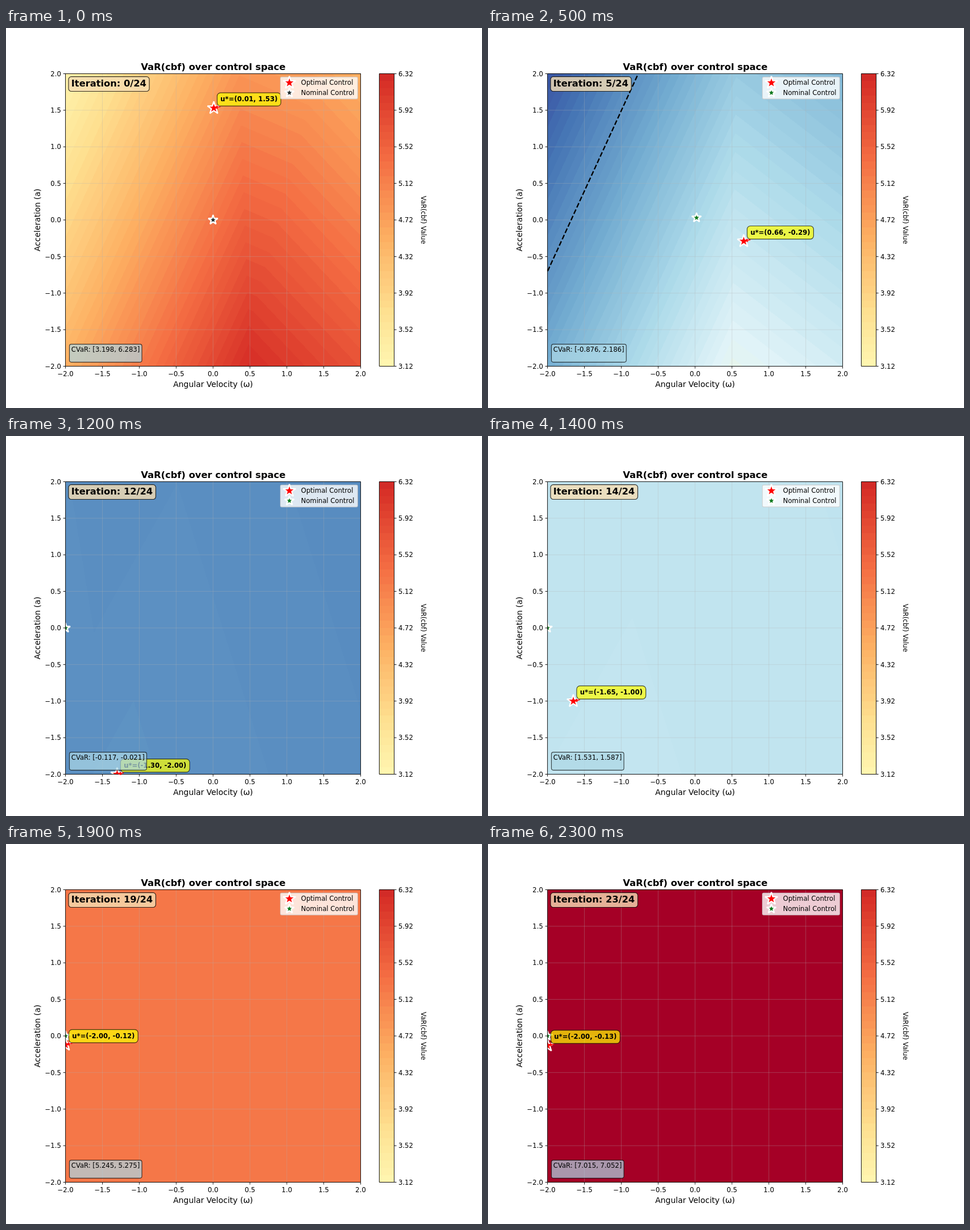
Animation of 837x669 px, one loop 2400 ms. Source, as an HTML page with a canvas:

```html
<!DOCTYPE html>
<html lang="en">
<head>
<meta charset="utf-8">
<title>VaR(cbf) over control space</title>
<style>
html, body { margin: 0; width: 100%; height: 100%; overflow: hidden; background: #fff; }
canvas { display: block; }
</style>
</head>
<body>
<canvas id="stage" width="837" height="669"></canvas>
<script>
const ctx = document.getElementById('stage').getContext('2d');
const PT = 1.1625; // pixels per typographic point
const LEFT = 104.6, RIGHT = 623.6, TOP = 80.4, BOTTOM = 595.5;
const MID_X = (LEFT + RIGHT) / 2, MID_Y = (TOP + BOTTOM) / 2;
const STEPS = 24, STEP_MS = 100;
const { min, max, floor, PI } = Math;

const px = w => MID_X + w * (RIGHT - LEFT) / 4;
const py = a => MID_Y - a * (BOTTOM - TOP) / 4;
const mix = (a, b, t) => a + (b - a) * t;
const signed = (v, n) => v.toFixed(n).replace('-', '\u2212');

// Colour scale: blue - yellow - red, 256 entries
const STOPS = ['313695', '4575b4', '74add1', 'abd9e9', 'e0f3f8', 'ffffbf',
  'fee090', 'fdae61', 'f46d43', 'd73027', 'a50026']
  .map(h => [0, 2, 4].map(i => parseInt(h.slice(i, i + 2), 16)));
const PALETTE = Array.from({ length: 256 }, (_, i) => {
  const p = i / 25.5, k = min(9, floor(p));
  return STOPS[k].map((c, j) => Math.round(mix(c, STOPS[k + 1][j], p - k)));
});
const colorOf = v => PALETTE[max(0, min(255, floor((v + 1.3) / 8.36 * 256)))];

// Value surfaces over angular velocity w and acceleration a
function surfaceStart(w, a) {
  return min(3.198 + .712 * (w + 2) - .324 * (a - 2),
    4.871 - .155 * (w - .35) - .357 * (a - 2),
    5.166 - .33 * (w - 1.1) - .31 * (a - .85));
}
function surfaceRidge(w, a) {
  return min(-.876 + .712 * (w + 2) - .324 * (a - 2),
    2.19 - .24 * (w - .53) - .31 * (a + 2));
}
function surfaceSlope(w, a) {
  const d = w - .9 - (a + 2) * .0975;
  return min(.3545 * d, .43 * d + .113);
}
function surfaceFlat(w, a) {
  const left = -.059 + .0308 * (w + 1.55 - a / 1.8);
  const edge = -.059 - .03 * (w + 1.66 + a * .16);
  return min(-.059 - .0214 * (w - .08 + a / 3.2), max(left, edge));
}

const SURFACES = [
  [0, surfaceStart], [5, surfaceRidge], [9, surfaceSlope], [12, surfaceFlat],
  [16, () => 3.187], [19, () => 5.26], [23, () => 7.033]
];
const RANGE = [[0, 3.198, 6.283], [5, -.876, 2.186], [9, -1.3, .39], [12, -.117, -.021],
  [16, 3.179, 3.195], [19, 5.245, 5.275], [23, 7.015, 7.052]];
const OPTIMAL = [[0, .01, 1.53], [5, .66, -.29], [9, 2, .24], [10, 2, 2], [12, -1.3, -2],
  [16, -2, 0], [19, -2, -.12], [23, -2, -.13]];
const NOMINAL = [[0, 0, 0], [5, .02, .03], [9, -2, .4], [12, -2, 0], [23, -2, 0]];

function segment(keys, n) {
  let i = 0;
  while (i < keys.length - 2 && n >= keys[i + 1][0]) i++;
  const a = keys[i], b = keys[i + 1];
  return [a, b, (n - a[0]) / (b[0] - a[0])];
}
function pairAt(keys, n) {
  const [a, b, t] = segment(keys, n);
  return [mix(a[1], b[1], t), mix(a[2], b[2], t)];
}
function surfaceAt(n) {
  const [a, b, t] = segment(SURFACES, n);
  if (t === 0) return a[1];
  if (t === 1) return b[1];
  return (w, y) => mix(a[1](w, y), b[1](w, y), t);
}
function levelStep(lo, hi) {
  const raw = (hi - lo) / 41, mag = 10 ** floor(Math.log10(raw));
  return mag * [1, 1.5, 2, 2.5, 3, 4, 5, 6, 8, 10].find(s => s * mag >= raw);
}

// Drawing helpers
function text(str, x, y, pt = 10, align = 'left', weight = '', angle = 0) {
  ctx.save();
  ctx.translate(x, y);
  ctx.rotate(angle);
  ctx.font = `${weight} ${pt * PT}px "DejaVu Sans", sans-serif`;
  ctx.textAlign = align;
  ctx.fillStyle = '#000';
  ctx.fillText(str, 0, 0);
  ctx.restore();
}
function textWidth(str, pt, weight = '') {
  ctx.font = `${weight} ${pt * PT}px "DejaVu Sans", sans-serif`;
  return ctx.measureText(str).width;
}
function line(x1, y1, x2, y2, color = '#000', width = .8 * PT) {
  ctx.beginPath();
  ctx.moveTo(x1, y1);
  ctx.lineTo(x2, y2);
  ctx.strokeStyle = color;
  ctx.lineWidth = width;
  ctx.stroke();
}
function box(x, y, w, h, r, fill, alpha, border = '#000', width = PT) {
  ctx.save();
  ctx.globalAlpha = alpha;
  ctx.beginPath();
  ctx.roundRect(x, y, w, h, r);
  ctx.fillStyle = fill;
  ctx.fill();
  ctx.strokeStyle = border;
  ctx.lineWidth = width;
  ctx.stroke();
  ctx.restore();
}
function star(x, y, size, fill) {
  ctx.beginPath();
  for (let i = 0; i < 10; i++) {
    const r = size / 2 * PT * (i % 2 ? .382 : 1), t = i * PI / 5;
    ctx.lineTo(x + r * Math.sin(t), y - r * Math.cos(t));
  }
  ctx.closePath();
  ctx.fillStyle = fill;
  ctx.fill();
  ctx.lineJoin = 'bevel';
  ctx.strokeStyle = '#fff';
  ctx.lineWidth = 2 * PT;
  ctx.stroke();
}

const heat = new ImageData(519, 516);
function drawHeat(f, lo, hi) {
  const step = levelStep(lo, hi), { width, height, data } = heat;
  for (let j = 0, p = 0; j < height; j++) {
    const a = 2 - (j + .5) / height * 4;
    for (let i = 0; i < width; i++, p += 4) {
      const v = f((i + .5) / width * 4 - 2, a);
      const c = colorOf((floor(v / step) + .5) * step);
      data[p] = c[0];
      data[p + 1] = c[1];
      data[p + 2] = c[2];
      data[p + 3] = 255;
    }
  }
  ctx.putImageData(heat, 105, 80);
}

// Dashed zero level, rising and falling sides separately
function drawZero(f) {
  ctx.save();
  ctx.setLineDash([7.4 * PT, 3.2 * PT]);
  ctx.strokeStyle = '#000';
  ctx.lineWidth = 2 * PT;
  for (const dir of [1, -1]) {
    ctx.beginPath();
    for (let j = 0; j <= 80; j++) {
      const a = -2 + j / 20;
      for (let i = 0; i < 80; i++) {
        const w = -2 + i / 20, v = dir * f(w, a), next = dir * f(w + .05, a);
        if (v < 0 && next >= 0) {
          ctx.lineTo(px(w + .05 * v / (v - next)), py(a));
          break;
        }
      }
    }
    ctx.stroke();
  }
  ctx.restore();
}

function drawAxes() {
  ctx.strokeStyle = '#000';
  ctx.lineWidth = .8 * PT;
  ctx.strokeRect(LEFT, TOP, RIGHT - LEFT, BOTTOM - TOP);
  for (let v = -2; v <= 2; v += .5) {
    line(px(v), BOTTOM, px(v), BOTTOM + 4);
    line(LEFT, py(v), LEFT - 4, py(v));
    text(signed(v, 1), px(v), 612.7, 10, 'center');
    text(signed(v, 1), 96.8, py(v) + 4.3, 10, 'right');
  }
  text('VaR(cbf) over control space', MID_X + .3, 73.6, 14, 'center', 'bold');
  text('Angular Velocity (\u03c9)', MID_X, 631.6, 12, 'center');
  text('Acceleration (a)', 60, MID_Y, 12, 'center', '', -PI / 2);
}

function drawLabel(w, a) {
  const x = px(w), y = py(a), str = `u*=(${w.toFixed(2)}, ${a.toFixed(2)})`;
  line(x + 11.7, y - 2.6, x + 2.5, y - .6, '#f00', 1.5 * PT);
  line(x + 6.6, y - 3.9, x + 2.5, y - .6, '#f00', 1.5 * PT);
  line(x + 7.6, y + .7, x + 2.5, y - .6, '#f00', 1.5 * PT);
  box(x + 5.9, y - 26.8, textWidth(str, 10, 'bold') + 11.6, 23.2, 5.8, '#ff0', .7);
  text(str, x + 11.7, y - 11.6, 10, 'left', 'bold');
}

function drawColorbar() {
  const x = 656.4, w = 26.2, h = (BOTTOM - TOP) / 40;
  for (let i = 0; i < 40; i++) {
    ctx.fillStyle = `rgb(${colorOf(3.16 + i * .08)})`;
    const y = Math.round(BOTTOM - (i + 1) * h);
    ctx.fillRect(x, y, w, Math.round(BOTTOM - i * h) - y);
  }
  ctx.strokeStyle = '#000';
  ctx.lineWidth = .8 * PT;
  ctx.strokeRect(x, TOP, w, BOTTOM - TOP);
  for (let i = 0; i <= 8; i++) {
    const y = BOTTOM - i * 5 * h;
    line(x + w, y, x + w + 4, y);
    text((3.12 + i * .4).toFixed(2), 690, y + 4.3);
  }
  text('VaR(cbf) Value', 730, MID_Y, 10, 'center', '', PI / 2);
}

function draw(n) {
  const f = surfaceAt(n), [lo, hi] = pairAt(RANGE, n);
  const [w, a] = pairAt(OPTIMAL, n), [nw, na] = pairAt(NOMINAL, n);
  const green = n ? '#107a20' : '#26302f';

  ctx.fillStyle = '#fff';
  ctx.fillRect(0, 0, 837, 669);
  drawHeat(f, lo, hi);
  for (let v = -1.5; v < 2; v += .5) {
    line(px(v), TOP, px(v), BOTTOM, 'rgba(176,176,176,.35)');
    line(LEFT, py(v), RIGHT, py(v), 'rgba(176,176,176,.35)');
  }
  ctx.save();
  ctx.beginPath();
  ctx.rect(LEFT, TOP, RIGHT - LEFT, BOTTOM - TOP);
  ctx.clip();
  drawZero(f);
  star(px(nw), py(na), 15, green);
  star(px(w), py(a), 20, '#f00');
  ctx.restore();
  drawAxes();
  drawLabel(w, a);

  const title = `Iteration: ${n}/24`;
  box(110, 85.7, textWidth(title, 14, 'bold') + 10, 25.8, 4.9, 'wheat', .8);
  text(title, 114.8, 103.3, 14, 'left', 'bold');
  const range = `CVaR: [${lo.toFixed(3)}, ${hi.toFixed(3)}]`;
  box(111.5, 556.7, textWidth(range, 10) + 7, 31.6, 3.5, 'lightblue', .7);
  text(range, 114.8, 569.8);

  box(482.5, 86.3, 135.8, 38.6, 2.3, '#fff', .8, '#ccc');
  star(498.3, 96.4, 20, '#f00');
  star(498.3, 114, 15, green);
  text('Optimal Control', 518.8, 100.2);
  text('Nominal Control', 518.8, 117.6);
  drawColorbar();
}

let shown = -1;
const start = performance.now();
function tick() {
  const n = floor((performance.now() - start) / STEP_MS) % STEPS;
  if (n !== shown) draw(shown = n);
  requestAnimationFrame(tick);
}
tick();
</script>
</body>
</html>
```
